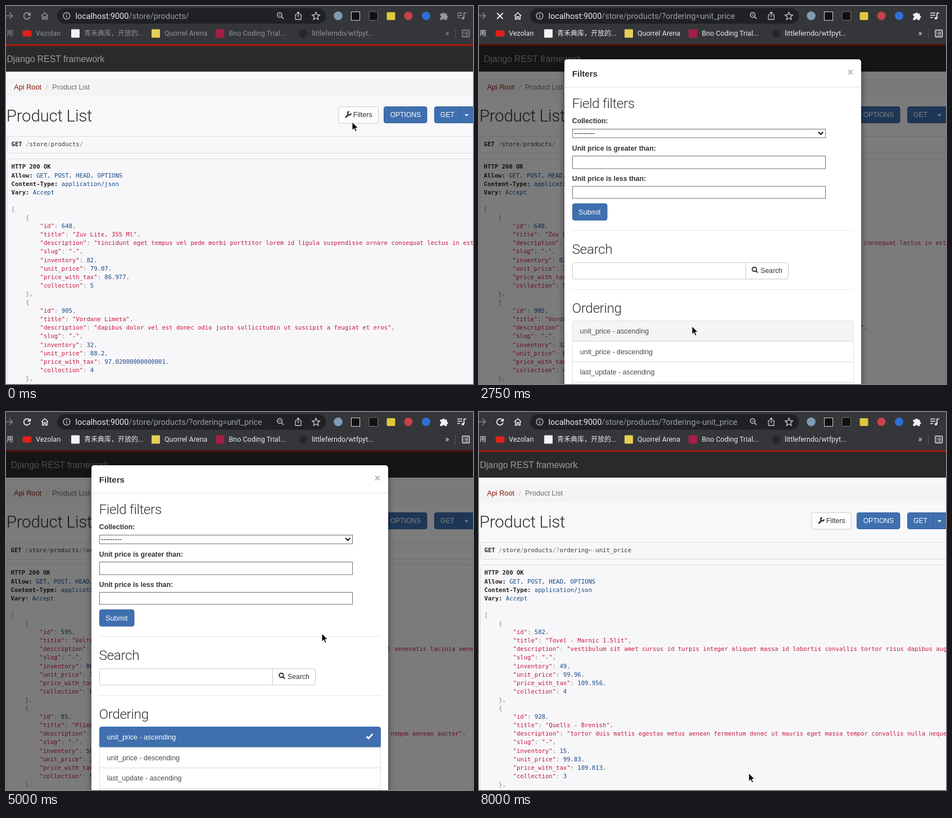
Animation of 831 by 674 pixels, one loop 8250 ms. Source, as an HTML page:

```html
<!DOCTYPE html>
<html lang="en">
<head>
<meta charset="utf-8">
<title>Product List</title>
<style>
  html, body { margin: 0; width: 100%; height: 100%; overflow: hidden; background: #f8f8fa; }
  svg { display: block; width: 100vw; height: 100vh; }
  text { white-space: pre; font-family: "Liberation Sans", Arial, sans-serif; }
  .ui { font-family: Roboto, "Noto Sans CJK SC", "Noto Sans CJK", sans-serif; }
  .light { font-family: Roboto, sans-serif; font-weight: 300; }
  .mono { font-family: "DejaVu Sans Mono", monospace; }
  .bold { font-weight: bold; }
</style>
</head>
<body>
<svg id="stage" viewBox="0 0 831 674"></svg>
<script>
const LOOP = 8250, STEP = 250;
const BLUE = '#3f6fae', BLUE_EDGE = '#36629c', INK = '#333';
const QUERIES = ['', '?ordering=unit_price', '?ordering=-unit_price'];

// id, title, description, inventory, unit price, price with tax, collection
const LISTS = [
  [[648, 'Zuv Lite, 355 Ml', 'tincidunt eget tempus vel pede morbi porttitor lorem id ligula suspendisse ornare consequat lectus in est risus', 82, '79.07', '86.977', 5],
   [905, 'Vordane Limeta', 'dapibus dolor vel est donec odio justo sollicitudin ut suscipit a feugiat et eros', 32, '88.2', '97.02000000000001', 4]],
  [[595, 'Veltris - 5, Paper', 'vestibulum rutrum rutrum neque aenean auctor gravida sem praesent id massa id nisl venenatis lacinia aenean sit', 86, '1.06', '1.1660000000000001', 6],
   [85, 'Plimor - 16/20, Folded Branewed', 'parturient montes nascetur ridiculus mus etiam vel augue vestibulum rutrum rutrum neque aenean auctor', 58, '1.08', '1.1880000000000002', 5]],
  [[582, 'Tovel - Marnic 1.5lit', 'vestibulum sit amet cursus id turpis integer aliquet massa id lobortis convallis tortor risus dapibus augue vel', 49, '99.96', '109.956', 4],
   [928, 'Quells - Brenish', 'tortor duis mattis egestas metus aenean fermentum donec ut mauris eget massa tempor convallis nulla neque libero', 15, '99.83', '109.813', 3]]
];

// time, x, y of the pointer tip
const POINTER = [
  [0, 616, 207], [750, 633, 197], [1000, 633, 196], [1500, 455, 410], [2000, 385, 574],
  [2250, 379, 571], [3250, 379, 571], [4250, 636, 195], [4500, 636, 195], [4750, 622, 215],
  [5250, 502, 575], [5750, 476, 627], [6000, 478, 616], [7250, 478, 616], [8000, 480, 644]
];

const clamp = v => Math.max(0, Math.min(1, v));
const easeOut = p => 1 - (1 - p) ** 2;

const rect = (x, y, w, h, fill, r = 0, stroke = 'none', sw = 1) =>
  `<rect x="${x}" y="${y}" width="${w}" height="${h}" rx="${r}" fill="${fill}" stroke="${stroke}" stroke-width="${sw}"/>`;
const circle = (x, y, r, fill, stroke = 'none', sw = 1.5) =>
  `<circle cx="${x}" cy="${y}" r="${r}" fill="${fill}" stroke="${stroke}" stroke-width="${sw}"/>`;
const line = (d, stroke, sw = 1.6) =>
  `<path d="${d}" fill="none" stroke="${stroke}" stroke-width="${sw}"/>`;
const shape = (d, fill) => `<path d="${d}" fill="${fill}"/>`;
const text = (x, y, s, size, fill = INK, cls = '', extra = '') =>
  `<text x="${x}" y="${y}" font-size="${size}" fill="${fill}" class="${cls}" ${extra}>${s}</text>`;
const span = (s, fill, cls = '') => `<tspan fill="${fill}" class="${cls}">${s}</tspan>`;
const lens = (x, y, r, color, sw) =>
  circle(x, y, r, 'none', color, sw) + line(`M${x + r * .7} ${y + r * .7}l${r * .9} ${r * .9}`, color, sw);

function pointerAt(t) {
  const i = POINTER.findIndex(k => k[0] > t);
  if (i < 0) return POINTER.at(-1).slice(1);
  const [t0, x0, y0] = POINTER[i - 1], [t1, x1, y1] = POINTER[i];
  const p = (t - t0) / (t1 - t0);
  return [x0 + (x1 - x0) * p, y0 + (y1 - y0) * p];
}

function browserBar(focused, loading, query) {
  const c = focused ? '#f1f3f4' : '#96989b', mark = focused ? '#e8eaed' : '#8d9094';
  const dim = '#c4c7ca';
  const bookmark = (x, s, size = 12.5) => text(x, 53, s, size, mark, 'ui');
  return rect(0, 0, 831, 68, '#35363a')
    + line('M-2 17.5H11M6 12l5.5 5.5L6 23', '#85878a')
    + (loading
      ? line('M32 12.5l10.5 10.5M42.5 12.5L32 23', c, 1.8)
      : line('M41.6 14.2A5.6 5.6 0 1 0 42.7 19', c, 1.7) + shape('M44 11v6h-6z', c))
    + line('M63 17.5l6-5.5 6 5.5M64.8 16.5v7h2.7v-4.5h3v4.5h2.7v-7', c, 1.5)
    + rect(91, 4, 478, 27.5, '#202124', 13.75)
    + circle(108, 17.5, 5.9, 'none', dim, 1.3) + rect(107.3, 16.7, 1.4, 4, dim) + rect(107.3, 14.2, 1.4, 1.4, dim)
    + text(123.5, 22.5, span('localhost:9000', '#e8eaed') + '/store/products/' + query, 14.42, '#9aa0a6', 'ui')
    + lens(487, 16, 4.3, dim, 1.5) + line('M485 16h4', dim, 1.1)
    + line('M517.5 15.5H515v8.5h10v-8.5h-2.5M520 20v-9M517.2 13.5l2.8-2.8 2.8 2.8', dim, 1.3)
    + line('M551.5 11l2 4.5 4.8.5-3.6 3.2 1 4.8-4.2-2.5-4.2 2.5 1-4.8-3.6-3.2 4.8-.5z', dim, 1.4)
    + circle(591, 17.5, 7.8, '#7f9bb5') + rect(614.5, 10.5, 15, 15, '#111', 0, '#d5d5d5')
    + rect(646, 10, 15.5, 15.5, '#111', 2, '#777') + rect(677.5, 11, 15, 14, '#e0c63b', 2)
    + circle(716, 17.5, 7.5, '#c8414b') + circle(747.5, 17.5, 7.5, '#2f6fd6')
    + shape('M772.5 13.5h4a2 2 0 1 1 4 0h4v4a2 2 0 1 1 0 4v3.5h-4a2 2 0 1 0-4 0h-4v-4a2 2 0 1 0 0-4z', c)
    + line('M803 12.5h9M803 16.5h9M803 20.5h5M815 22v-9.5h4', c, 1.7) + circle(813, 21.8, 2.3, c)
    + bookmark(1, '用', 12)
    + rect(29.5, 43.5, 16, 11, '#e32119', 3) + bookmark(53, 'Vezolan')
    + rect(116, 41.5, 15, 15, '#f4f4f4', 1) + bookmark(139, '青禾典库，开放的...', 12)
    + rect(259, 41.5, 15, 15, '#e5cf56', 1) + bookmark(282, 'Quorrel Arena')
    + rect(373, 41.5, 15.5, 15, '#a41f45') + bookmark(396.5, 'Bno Coding Trial...')
    + circle(529, 49, 7.5, '#25272b') + bookmark(544, 'littleferndo/wtfpyt...')
    + text(781.5, 53, '»', 15, c, 'ui') + rect(799, 41, 1, 16, '#55575a')
    + rect(812, 43, 12.5, 12, 'none', 1, c, 1.3)
    + line('M814 46.5h1.5M817 46.5h5.5M814 49.2h1.5M817 49.2h5.5M814 52h1.5M817 52h5.5', c, 1.2);
}

function filterButton(focused, hover) {
  return (focused ? rect(593.5, 180.5, 68, 27, '#dfdfe6', 3, '#1c48b0', 2)
    : rect(592, 179.5, 70.5, 29.5, hover ? '#e6e6e8' : '#fdfdfe', 3.5, hover ? '#adadad' : '#ccc'))
    + line('M604.3 198.8l5.5-5.5', INK, 3)
    + line('M610.8 188.4a2.9 2.9 0 1 0 3 3', INK, 2.3)
    + text(617.8, 198.3, 'Filters', 12.5);
}

// Punctuation is grey, strings red and numbers blue once the page script has run.
const highlight = s => s.replace(/"[^"]*"|\d[\d.]*|[^"\d]+/g, m =>
  span(m, m[0] === '"' ? '#c5183c' : /\d/.test(m) ? '#17498a' : '#7d8487'));
const highlightPath = s => s.replace(/[/?=-]+|[^/?=-]+/g, m =>
  span(m, /[/?=-]/.test(m) ? '#858c8e' : '#38383c'));

function itemLines([id, title, description, inventory, price, tax, collection]) {
  const fields = { id, title: `"${title}"`, description: `"${description}"`, slug: '"-"',
    inventory, unit_price: price, price_with_tax: tax, collection };
  const rows = Object.entries(fields).map(([k, v]) => `        "${k}": ${v}`);
  return ['    {', ...rows.map((r, i) => i < rows.length - 1 ? r + ',' : r), '    },'];
}

function page({ list, plain, shifted, hover }) {
  const x = shifted ? 8.5 : 9.5, left = shifted ? 1.5 : 2.5, width = shifted ? 829 : 850;
  const mono = (y, s) => text(x, y, s, 10.6, '#222', 'mono');
  const head = (k, v) => span(k + ':', '#222', 'bold') + ' ' + span(v, '#17498a');
  const path = '/store/products/' + QUERIES[list];
  const body = ['[', ...LISTS[list].flatMap(itemLines)];
  const lines = [
    span('HTTP 200 OK', '#222', 'bold'),
    head('Allow', 'GET, POST, HEAD, OPTIONS'), head('Content-Type', 'application/json'), head('Vary', 'Accept'), '',
    ...(plain ? body : body.map(highlight))
  ];
  return rect(0, 67, 831, 607, '#f8f8fa')
    + rect(0, 71, 831, 46, '#2a2a2a') + rect(0, 67.5, 831, 4, '#9c1c10')
    + text(shifted ? 8.8 : 1.5, 100, 'Django REST framework', 15.75, '#9b9b9b')
    + rect(0, 130, 831, 31, '#f4f4f5', 3)
    + text(14.3, 149.3, 'Api Root', 12.7, '#8c1408') + text(71, 149.3, '/', 12.7, '#bbb')
    + text(82.3, 149.3, 'Product List', 12.7, '#6c6c6c')
    + text(.8, 206.2, 'Product List', 29.6, '#2c2c2c', 'light', 'letter-spacing="-.3"')
    + filterButton(shifted, hover)
    + rect(672.5, 179.5, 76.5, 29, BLUE, 3.5, BLUE_EDGE) + text(683.7, 198.3, 'OPTIONS', 12.1, '#fff')
    + rect(762.5, 179.5, 75, 29, BLUE, 3.5, BLUE_EDGE) + text(773, 198.3, 'GET', 12.1, '#fff')
    + rect(808, 180, 1, 28, BLUE_EDGE) + shape('M816 193h7l-3.5 3.7z', '#fff')
    + rect(left, 232.5, width, 30, '#f7f7f9', 3.5, '#dddde3')
    + mono(250.3, span('GET', '#222', 'bold') + ' ' + (plain ? path : highlightPath(path)))
    + rect(left, 272.5, width, 420, '#f7f7f9', 3.5, '#dddde3')
    + lines.map((s, i) => mono(290.4 + 15.1 * i, s)).join('');
}

function modal(list, rowHover) {
  const heading = (y, s) => text(165.5, y, s, 24.6, INK, 'light', 'letter-spacing="-.5"');
  const label = (y, s) => text(165.8, y, s, 12.3, INK, 'bold');
  const box = (y, h) => rect(166.5, y + .5, 450, h, '#fff', 0, '#6f6f6f');
  const rule = y => rect(166, y, 501, 1, '#e8e8e8');
  const rows = ['unit_price - ascending', 'unit_price - descending', 'last_update - ascending', 'last_update - descending'];
  const row = (s, i) => {
    const y = 561.5 + 36.6 * i, active = list === 1 && i === 0;
    return rect(166.5, y, 500, 36.6, active ? BLUE : i === rowHover ? '#f4f4f4' : '#fff', i ? 0 : 3, active ? BLUE : '#ddd')
      + text(179.8, y + 22.5, s, 12.5, active ? '#fff' : '#4a4a4a')
      + (active ? line('M641.5 578.5l3.5 3.5 7.5-8', '#fff', 2.8) : '');
  };
  return `<g style="filter:drop-shadow(0 4px 6px rgba(0,0,0,.5))">${rect(152, 95, 528, 650, '#fff', 5)}</g>`
    + text(165.8, 125.5, 'Filters', 15, INK, 'bold')
    + text(655.5, 123.5, '×', 18.5, '#b4b4b4', 'bold')
    + rect(152, 144, 528, 1, '#e2e2e2')
    + heading(182.3, 'Field filters')
    + label(209, 'Collection:') + box(219, 15.5) + text(169, 231, '---------', 12.3, '#111')
    + line('M604 224.8l4.2 4 4.2-4', '#111', 2)
    + label(258, 'Unit price is greater than:') + box(267, 22.5)
    + label(312, 'Unit price is less than:') + box(321, 21.5)
    + rect(166.5, 352.5, 61.5, 29.5, BLUE, 3.5, BLUE_EDGE) + text(177, 371.8, 'Submit', 12.7, '#fff')
    + rule(400)
    + heading(442, 'Search')
    + rect(166.5, 457.5, 384, 29.5, '#fff', 3.5, '#c8c8c8') + rect(474, 458, 1, 29, '#c8c8c8')
    + lens(490, 469.5, 3.8, INK, 2) + text(501, 476, 'Search', 12.3)
    + rule(505)
    + heading(547, 'Ordering')
    + rows.map(row).join('');
}

const pointer = (x, y) =>
  `<path transform="translate(${x} ${y})" d="M0 0V14.5L3.4 11.4 5.7 16.8 8.1 15.8 5.8 10.5H10.4Z" fill="#000" stroke="#fff"/>`;

function scene(t) {
  const within = (a, b) => t >= a && t < b;
  const query = t < 2750 ? 0 : t < 6500 ? 1 : 2;
  const list = t < 3000 ? 0 : t < 6750 ? 1 : 2;
  const loading = within(2250, 3250) || within(6000, 7000);
  const plain = within(3000, 3250) || within(6750, 7000);
  // Opening the dialog removes the scrollbar and shifts the page a little.
  const shifted = within(1000, 3000) || within(4500, 6750);
  const opened = shifted ? t - (t < 3000 ? 960 : 4500) : 0;
  const [x, y] = pointerAt(t);

  const hover = t >= 1000 && x > 592 && x < 663 && y > 179 && y < 209;
  let out = page({ list, plain, shifted, hover });
  if (shifted) out += `<rect y="67" width="831" height="607" opacity="${.5 * clamp(opened / 150)}"/>`;
  if (opened > 150) {
    const slide = -160 * (1 - easeOut(clamp((opened - 150) / 300)));
    const settled = opened > 450 && x > 166 && x < 667;
    const rowHover = settled ? Math.floor((y - 561.5) / 36.6) : -1;
    out += `<g opacity="${clamp((opened - 150) / 150)}" transform="translate(0 ${slide})">${modal(list, rowHover)}</g>`;
  }
  return out + browserBar(t >= 1000, loading, QUERIES[query]) + pointer(x, y);
}

const stage = document.getElementById('stage');
let shown = -1;
function tick() {
  const t = Math.floor(performance.now() % LOOP / STEP) * STEP;
  if (t !== shown) stage.innerHTML = scene(shown = t);
  requestAnimationFrame(tick);
}
tick();
</script>
</body>
</html>
```
